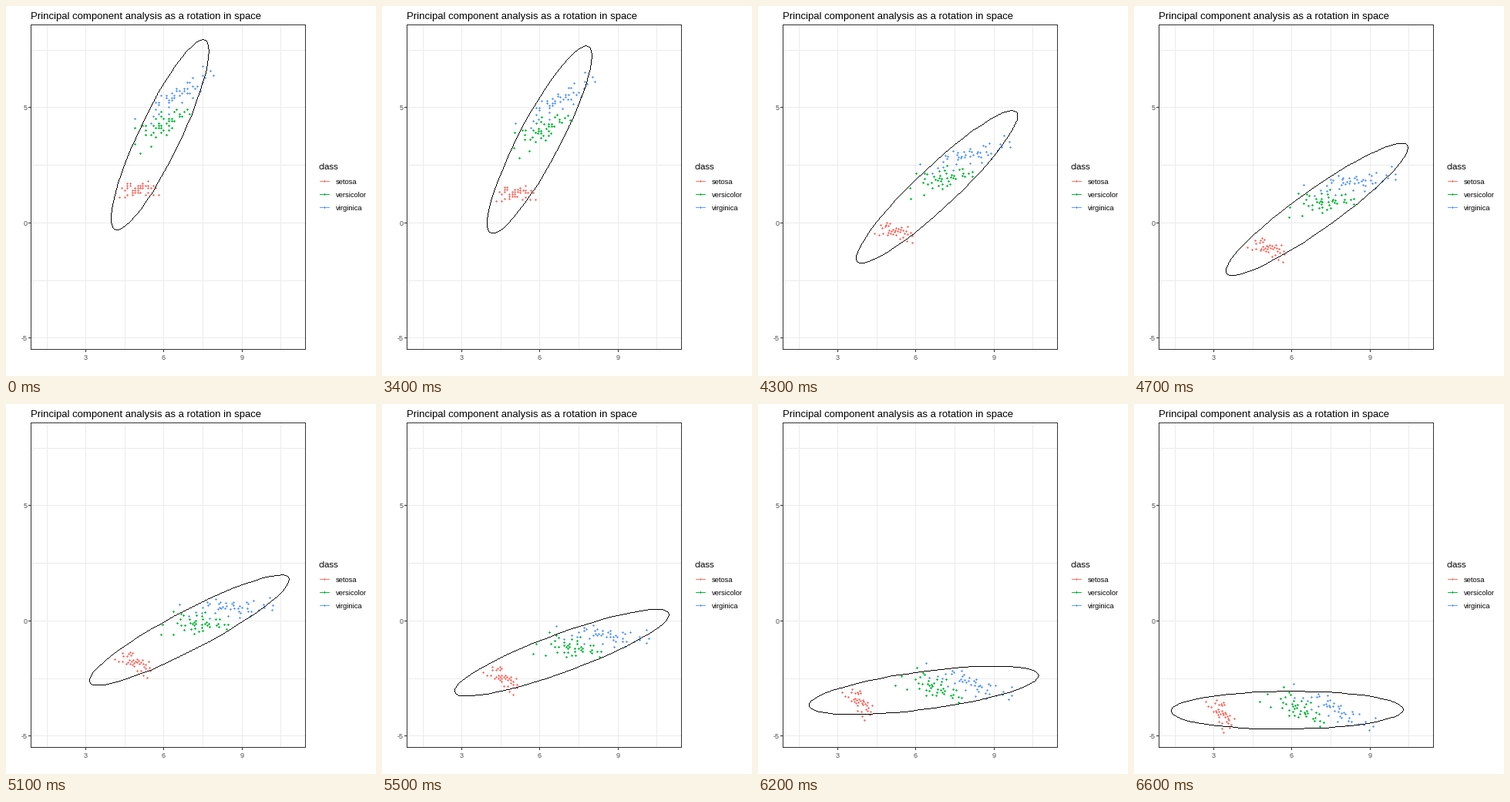
Animation of 480 by 480 pixels, one loop 10 s. Source, as a matplotlib script:

```python
import numpy as np
import matplotlib.pyplot as plt
from matplotlib.animation import FuncAnimation
from matplotlib.collections import PolyCollection
from matplotlib.patches import Rectangle

SIZE, DPI = 480, 96
PT = 72 / DPI                      # points per pixel
FRAMES, INTERVAL = 100, 100
HOLD, STEPS = 33, 33               # still frames, then rotation steps
TURN = np.radians(66.82)           # angle to the principal axes

plt.rcParams["font.family"] = "Liberation Sans"

# class -> colour, mean, spread, correlation, outermost points
CLASSES = {
    "setosa": ("#F8766D", (5.0, 1.46), (0.34, 0.17), 0.27,
               [(4.3, 1.1), (5.8, 1.2)]),
    "versicolor": ("#00BA38", (5.94, 4.27), (0.50, 0.45), 0.75,
                   [(5.1, 3.0), (7.0, 4.7)]),
    "virginica": ("#619CFF", (6.6, 5.56), (0.60, 0.54), 0.87,
                  [(4.9, 4.5), (7.9, 6.4)]),
}

# ellipse of the whole sample: centre, semi-axes, tilt
CENTRE = np.array([5.85, 3.82])
AXES = np.array([4.46, 0.82])
TILT = np.radians(67.27)
t = np.linspace(0, 2 * np.pi, 52)
CIRCLE = np.array([np.cos(t), np.sin(t)])

SQUARE = np.array([(0, 0), (1, 0), (1, 1), (0, 1)])
# a three pixel wide plus around a pixel
PLUS = np.array([(0, -1), (1, -1), (1, 0), (2, 0), (2, 1), (1, 1),
                 (1, 2), (0, 2), (0, 1), (-1, 1), (-1, 0), (0, 0)])


def rotation(angle):
    c, s = np.cos(angle), np.sin(angle)
    return np.array([[c, -s], [s, c]])


def to_px(xy):
    """Data coordinates to stage pixels."""
    return np.asarray(xy) * [33.75, -29.9] + [1.93, 280.9]


def sample(rng, mean, spread, corr, outer, count=48):
    """A correlated cloud of measurements, rounded to tenths."""
    z = rng.standard_normal((count, 2))
    z = np.clip((z - z.mean(0)) / z.std(0), -2, 2)
    z[:, 1] = corr * z[:, 0] + np.sqrt(1 - corr ** 2) * z[:, 1]
    cloud = np.round(np.array(mean) + z * spread, 1)
    return np.unique(np.vstack([cloud, outer]), axis=0)


def stamp(px, shape):
    return np.round(px)[:, None, :] + shape


def trace(outline):
    """Pixels of a one pixel wide line through the outline's points."""
    corners = np.round(outline)
    parts = []
    for start, end in zip(corners[:-1], corners[1:]):
        count = int(np.abs(end - start).max())
        parts.append(np.linspace(start, end, count, endpoint=False))
    return np.vstack(parts)


fig = plt.figure(figsize=(SIZE / DPI, SIZE / DPI), dpi=DPI, facecolor="white")
ax = fig.add_axes([0, 0, 1, 1])
ax.set(xlim=(0, SIZE), ylim=(SIZE, 0))
ax.axis("off")


def bar(x, y, width, height, color, zorder=1):
    ax.add_patch(Rectangle((x, y), width, height, facecolor=color,
                           linewidth=0, zorder=zorder))


def text(x, y, s, px, color="black", ha="left"):
    ax.text(x, y, s, fontsize=px * PT, color=color, ha=ha, va="baseline")


def shapes(verts, color, zorder=3):
    group = PolyCollection(verts, facecolors=color, linewidths=0,
                           snap=False, zorder=zorder)
    ax.add_collection(group, autolim=False)
    return group


# panel
LEFT, RIGHT, TOP, BOTTOM = 32, 388, 24, 445
WIDTH, HEIGHT = RIGHT - LEFT + 1, BOTTOM - TOP + 1
GRID, DARK, GREY = "#EBEBEB", "#333333", "#4D4D4D"
for v in np.arange(1.5, 11, 1.5):
    x = round(to_px((v, 0))[0])
    bar(x, TOP, 1, HEIGHT, GRID)
    if v % 3 == 0:
        bar(x, BOTTOM, 1, 4, DARK)
        text(x, 459, f"{v:.0f}", 9, GREY, "center")
for v in np.arange(-5, 8, 2.5):
    y = round(to_px((0, v))[1])
    bar(LEFT, y, WIDTH, 1, GRID)
    if v % 5 == 0:
        bar(LEFT - 3, y, 4, 1, DARK)
        text(27.5, y + 4, f"{v:.0f}", 9, GREY, "right")
for y in (TOP, BOTTOM):
    bar(LEFT, y, WIDTH, 1, DARK, zorder=5)
for x in (LEFT, RIGHT):
    bar(x, TOP, 1, HEIGHT, DARK, zorder=5)
text(32, 17, "Principal component analysis as a rotation in space", 13.15)

# legend and point clouds
text(405, 212, "class", 11.2)
rng = np.random.default_rng(4)
clouds = []
for row, (name, (color, *stats)) in enumerate(CLASSES.items()):
    y = int(227.3 + 17.28 * row)
    bar(407, y, 13, 1, color)
    shapes(stamp(np.array([[413, y]]), PLUS), color)
    text(428, y + 4, name, 9.4)
    points = sample(rng, *stats)
    clouds.append((points, shapes(stamp(to_px(points), PLUS), color)))
ellipse = shapes([], "black", zorder=4)


def update(i):
    step = np.clip(i - HOLD, 0, STEPS)
    turn = rotation(-TURN * step / STEPS)
    for points, cloud in clouds:
        cloud.set_verts(stamp(to_px(points @ turn.T), PLUS))
    frame = turn @ rotation(TILT)
    root = np.linalg.cholesky(frame @ np.diag(AXES ** 2) @ frame.T)
    outline = to_px(turn @ CENTRE + (root @ CIRCLE).T)
    ellipse.set_verts(stamp(trace(outline), SQUARE))
    return [cloud for _, cloud in clouds] + [ellipse]


anim = FuncAnimation(fig, update, frames=FRAMES, interval=INTERVAL,
                     repeat=True, repeat_delay=0, blit=False)
plt.show()
```
